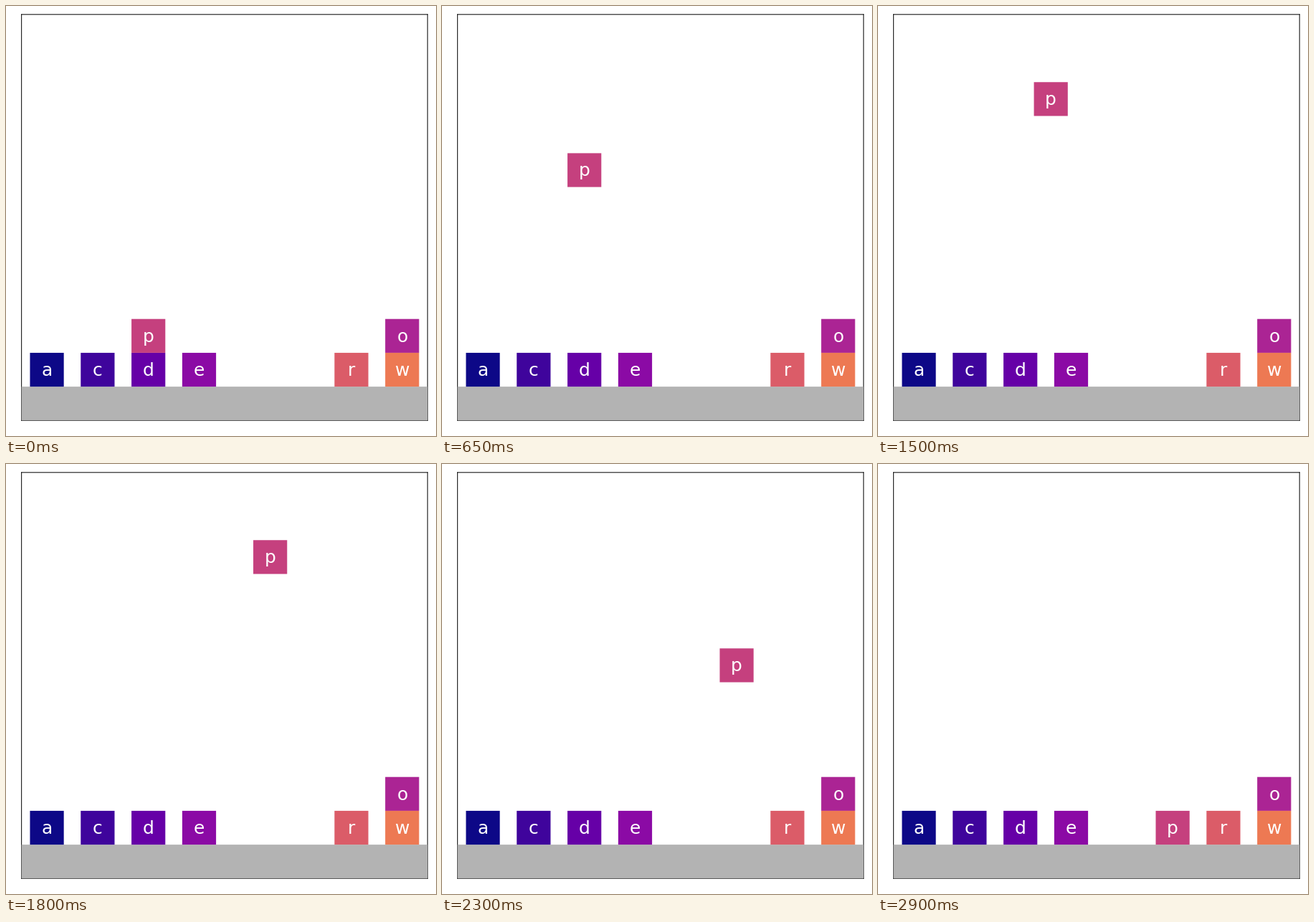
These frames come from a looping animation (600x600 px, 2.95 s). A matplotlib script:

```python
import matplotlib.pyplot as plt
from matplotlib.animation import FuncAnimation
from matplotlib.patches import Rectangle

SIZE, DPI, SPAN = 600, 100, 12
MM = DPI / 25.4
NEAR, FAR = 5.5 * MM, SIZE - 3 * MM  # plot edges in pixels
FRAMES, INTERVAL, TICKS = 59, 50, 20

# name -> (column, level); level 0 rests on the table
BLOCKS = {"a": (0, 0), "c": (1, 0), "d": (2, 0), "e": (3, 0),
          "o": (7, 1), "p": (2, 1), "r": (6, 0), "w": (7, 0)}
MOVER, TARGET, LIFT = "p", (5, 0), 9
BASELINE = 0.32  # letter baseline above the block's lower edge


def corner(column, level):
    return 0.25 + 1.5 * column, 1 + level


def mix(a, b, t):
    return a + (b - a) * t


fig = plt.figure(figsize=(SIZE / DPI, SIZE / DPI), dpi=DPI, facecolor="white")
side = (FAR - NEAR) / SIZE
ax = fig.add_axes([NEAR / SIZE, NEAR / SIZE, side, side])
ax.set(xlim=(0, SPAN), ylim=(0, SPAN), xticks=[], yticks=[])
for spine in ax.spines.values():
    spine.set(linewidth=72 / DPI, snap=False, zorder=0.5)


def add_box(x, y, width, color):
    # unsnapped edges keep the motion smooth between pixels
    return ax.add_patch(Rectangle((x, y), width, 1, facecolor=color, linewidth=0,
                                  snap=False, clip_on=False))


add_box(0, 0, SPAN, "0.7")
parts = {}
for i, (name, place) in enumerate(BLOCKS.items()):
    x, y = corner(*place)
    label = ax.text(x + 0.5, y + BASELINE, name, color="white", fontsize=18,
                    family="DejaVu Sans", ha="center", va="baseline")
    parts[name] = add_box(x, y, 1, plt.cm.plasma(i / 10.5)), label


def position(tick):
    """Lift, pause and slide across, then lower: 20 ticks each."""
    (x0, y0), (x1, y1) = corner(*BLOCKS[MOVER]), corner(*TARGET)
    stage, t = divmod(tick, TICKS)
    t /= TICKS
    if stage == 0:
        return x0, mix(y0, LIFT, t)
    if stage == 1:
        return mix(x0, x1, max(0, 2 * t - 1)), LIFT
    if stage == 2:
        return x1, mix(LIFT, y1, t)
    return x1, y1


def update(frame):
    # 61 ticks spread over 59 frames, rounded up
    tick = -(-frame * 3 * TICKS // (FRAMES - 1))
    x, y = position(tick)
    box, label = parts[MOVER]
    box.set_xy((x, y))
    label.set_position((x + 0.5, y + BASELINE))
    return box, label


anim = FuncAnimation(fig, update, frames=FRAMES, interval=INTERVAL,
                     init_func=lambda: update(0), repeat=True, repeat_delay=0)
plt.show()
```
